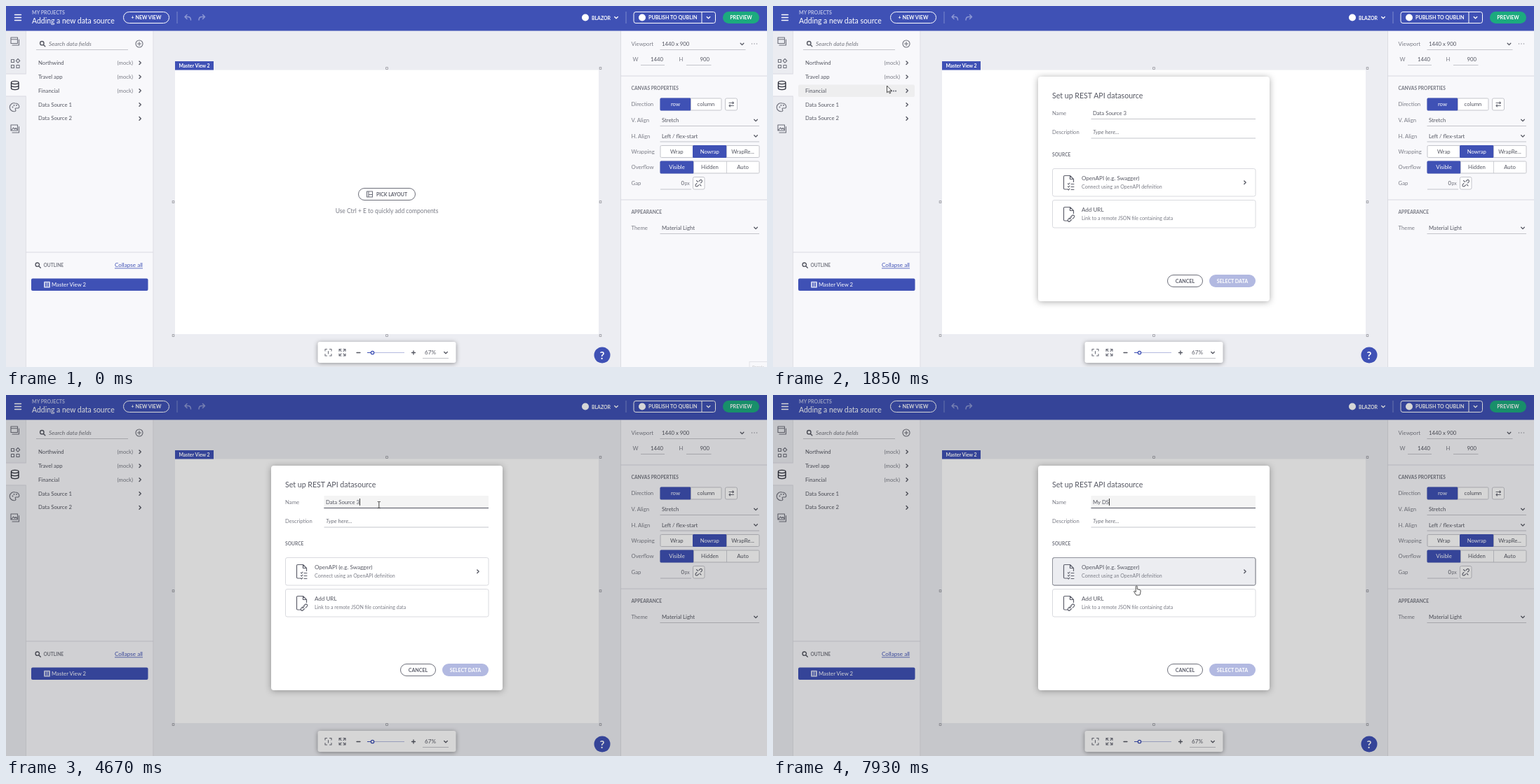
An HTML page for the animation above (7990 ms loop, 1085x516 px).

```html
<!DOCTYPE html>
<html lang="en">
<head>
<meta charset="utf-8">
<title>Adding a new data source</title>
<style>
html, body { margin: 0; width: 100%; height: 100%; overflow: hidden; background: #ecedf2; }
svg { display: block; width: 1085px; height: 516px; }
text { font: 7.75px Lato, "Open Sans", sans-serif; fill: #555762; dominant-baseline: central; white-space: pre; }
.label { fill: #7b7d87; }
.white { fill: #fff; }
.caps { font-size: 7.1px; font-weight: 700; fill: #5f616d; }
.head { font-size: 6.65px; font-weight: 700; fill: #777983; }
.caps.white { fill: #fff; }
.hint { font-style: italic; font-size: 8.1px; fill: #73757e; }
.off { fill: #c1c2c7; }
.mid { text-anchor: middle; }
.end { text-anchor: end; }
.icon { fill: none; stroke: #6d6f7a; stroke-width: 1.1; stroke-linecap: round; stroke-linejoin: round; }
.shadow { filter: drop-shadow(0 1px 3px #0006); }
</style>
</head>
<body>
<svg id="stage" viewBox="0 0 1085 516"></svg>
<script>
const BLUE = '#3f51b5', LINE = '#c4c5cb', INK = '#555762';

const text = (x, y, s, cls = '', size) =>
  `<text x="${x}" y="${y}" class="${cls}"${size ? ` style="font-size:${size}px"` : ''}>${s}</text>`;
const box = (x, y, w, h, fill, extra = '') =>
  `<rect x="${x}" y="${y}" width="${w}" height="${h}" fill="${fill}" ${extra}/>`;
const stroked = (x, y, w, h, color, r = 2, fill = 'none') =>
  box(x, y, w, h, fill, `stroke="${color}" rx="${r}"`);
const path = (d, stroke = '#6d6f7a', extra = '') =>
  `<path d="${d}" class="icon" style="stroke:${stroke};${extra}"/>`;
const dot = (x, y, r, fill) => `<circle cx="${x}" cy="${y}" r="${r}" fill="${fill}"/>`;
const hline = (x1, x2, y, color = LINE) => box(x1, y - .5, x2 - x1, 1, color);
const down = (x, y, c = INK) => path(`M${x - 2.3} ${y - 1}l2.3 2.3 2.3-2.3`, c, 'stroke-width:1.3');
const right = (x, y, c = INK) => path(`M${x - 1} ${y - 2.3}l2.3 2.3-2.3 2.3`, c, 'stroke-width:1.4');
const lens = (x, y) => path(`M${x + 1.2} ${y + 1.2}l2.6 2.6M${x + 2} ${y - .8}a2.7 2.7 0 1 1-5.4 0a2.7 2.7 0 1 1 5.4 0`, INK, 'stroke-width:1.4');
const layer = (id, content) => `<g id="${id}">${content}</g>`;

function header() {
  return box(0, 0, 1085, 35.5, BLUE) +
    path('M12.5 12.5h9M12.5 16.5h9M12.5 20.5h9', '#fff', 'stroke-width:1.4') +
    text(37, 9.3, 'MY PROJECTS', 'caps', 7).replace('<text', '<text style="fill:#b9c0e6"').replace(' style="font-size:7px"', '') +
    text(37, 20.8, 'Adding a new data source', 'white', 10.45) +
    stroked(167.5, 8.5, 65, 16, '#fff', 8) + text(200, 16.5, '+ NEW VIEW', 'caps white mid') +
    box(243.5, 8, 1, 17, '#7d89cd') +
    path('M258 12.5l-3 3 3 3M255.300 15.500h4.500q3.500 0 3.700 4.500', '#8c97d3', 'stroke-width:1.5') +
    path('M280.500 12.500l3 3-3 3M283.200 15.500h-4.500q-3.500 0-3.700 4.500', '#8c97d3', 'stroke-width:1.5') +
    dot(826, 16.500, 5, '#fff') + text(835, 16.5, 'BLAZOR', 'caps white', 6.9) + down(870, 16.5, '#fff') +
    box(883.5, 8, 1, 17, '#7d89cd') +
    stroked(895, 8.5, 116.5, 16, '#fff', 3) + box(991.5, 8.5, 1, 16, '#fff') +
    dot(907, 16.5, 5, '#fff') + text(916, 16.5, 'PUBLISH TO QUBLIN', 'caps white') + down(1001.5, 16.5, '#fff') +
    box(1022, 8, 52, 17, '#1caa7e', 'rx="8.5"') + text(1048, 16.5, 'PREVIEW', 'caps white mid');
}

function rail() {
  return box(0, 35.5, 28, 481, '#ebecf1') + box(0, 97, 28, 32, '#f8f8fb') +
    hline(0, 28, 97, '#d9dae1') + hline(0, 28, 129, '#d9dae1') +
    path('M7 45h9.500v8.500h-9.500zM7 47.700h9.500M9 56h9.500v-8') +
    path('M7.500 76.500h4v4h-4zM7.500 84.500h4v4h-4zM15 84.500h4v4h-4zM17 75.500l2.800 2.800-2.800 2.800-2.800-2.800z') +
    path('M7.500 109.500a5 2 0 0 1 10.500 0v8a5 2 0 0 1-10.500 0zM7.500 109.500a5 2 0 0 0 10.500 0M7.500 113.500a5 2 0 0 0 10.500 0', '#32343f', 'stroke-width:1.4') +
    path('M13 139a6 6 0 1 0 0 11.500q1.500-.500.500-2.500t1-2h3q1.500-.500 1.300-2.500q-1-4.500-5.800-4.500z') +
    [[9.5, 144.5], [11.5, 142], [15, 142]].map(p => dot(...p, .9, '#6d6f7a')).join('') +
    path('M7 170h9.500v8h-9.500zM8 177l2.500-3 2 2 1.500-1.500 2 2M9 181h9.500v-8.500');
}

function leftPanel() {
  const rows = ['Northwind', 'Travel app', 'Financial', 'Data Source 1', 'Data Source 2'];
  return box(28, 35.5, 182, 481, '#f8f8fb') + box(28, 35.5, .8, 481, '#d9dae1') + box(209.5, 35.5, .8, 481, '#d9dae1') +
    box(28, 97.5, 1, 31, '#f8f8fb') + layer('rowHover', box(36, 112.5, 166, 17.5, '#eeeeef', 'rx="2"')) +
    lens(52, 54) + text(61, 53.7, 'Search data fields', 'hint', 8.3) + hline(43, 174, 62.5) +
    layer('plusHover', dot(190, 54, 8.5, '#e6e7ec')) +
    path('M195 54a5 5 0 1 1-10 0a5 5 0 1 1 10 0M187.500 54h5M190 51.500v5') +
    rows.map((s, i) => text(46, 80.8 + i * 19.9, s) + right(191, 81.3 + i * 19.9)).join('') +
    text(181, 80.8, '(mock)', 'label end') + text(181, 100.7, '(mock)', 'label end') +
    layer('mock', text(181, 120.6, '(mock)', 'label end')) +
    layer('dots', [169, 172, 175].map(x => dot(x, 121.5, .9, INK)).join('')) +
    hline(28, 210, 352, '#d9dae1') + lens(45.5, 370.5) + text(53.5, 369.8, 'OUTLINE', 'head') +
    text(195, 369.5, 'Collapse all', 'end', 8.1).replace('<text', `<text fill="${BLUE}" text-decoration="underline"`).replace('style="', `style="fill:${BLUE};`) +
    box(36, 389.5, 166.5, 17.5, BLUE, 'rx="2"') + box(54, 393.8, 9, 9, '#c9cfec', 'rx="1"') +
    path('M57 396v4.500M60 396v4.500', BLUE, 'stroke-width:1.5') + text(65, 398, 'Master View 2', 'white');
}

function canvasArea() {
  const handles = [[543, 89], [847.5, 89], [238.5, 280], [847.5, 280], [238.5, 471], [543, 471], [847.5, 471]];
  return box(241, 91.5, 604, 377.5, '#fff') + box(241, 79, 55, 12.5, BLUE) +
    text(268.5, 85, 'Master View 2', 'caps white mid', 6.9) +
    handles.map(([x, y]) => box(x - 1.3, y - 1.3, 2.6, 2.6, '#fff', 'stroke="#8a8c95" stroke-width=".8"')).join('') +
    stroked(502.5, 260.5, 81, 17, '#6d6f7a', 8.5) +
    path('M514.500 265h8v8h-8zM517 265v8M517 269.500h5.500') + text(528, 269, 'PICK LAYOUT', 'caps', 6.9) +
    text(543, 293.3, 'Use Ctrl + E to quickly add components', 'label mid', 8.5) +
    box(444.5, 480, 197, 30, '#fff', 'rx="3" class="shadow"') +
    path('M455 493v-2.500h2.500M461.500 490.500h2.500v2.500M464 497.500v2.500h-2.500M457.500 500h-2.500v-2.500M459.500 493.500v3.500') +
    path('M475 493.500v-3h3M481 490.500h3v3M484 497v3h-3M478 500h-3v-3M475 490.500l3 3M484 490.500l-3 3M484 500l-3-3M475 500l3-3') +
    path('M500 495.500h5M578.500 495.500h5M581 493v5', INK, 'stroke-width:1.3') +
    hline(515, 568, 495.500, '#b5bbdf') + hline(515, 522, 495.5, BLUE) +
    `<circle cx="522.5" cy="495.5" r="2.2" fill="#fff" stroke="${BLUE}" stroke-width="1.3"/>` +
    text(597, 495, '67%', '', 8.1) + down(627, 495.5) + hline(594, 631, 503.5) +
    dot(850, 499, 11.5, BLUE) + text(850, 499, '?', 'caps white mid', 15);
}

function segments(y, labels, edges, active) {
  const x0 = edges[0], last = edges[edges.length - 1];
  return stroked(x0, y, last - x0, 17, LINE, 1.5, '#fff') + labels.map((s, i) => {
    const x = edges[i], w = edges[i + 1] - x, on = i === active;
    return (on ? box(x - .5, y - .5, w + 1, 18, BLUE, 'rx="1.5"') : i ? box(x, y, .8, 17, LINE) : '') +
      text(x + w / 2, y + 8.2, s, on ? 'white mid' : 'mid');
  }).join('');
}

function rightPanel() {
  const labels = [['Viewport', 54], ['Direction', 140], ['V. Align', 163], ['H. Align', 185.5],
    ['Wrapping', 208], ['Overflow', 230], ['Gap', 252.8], ['Theme', 317]];
  const select = (y, s, end = 1074) => text(935, y, s) + hline(932.5, end, y + 8.5) + down(end - 5, y + .3);
  return box(876, 35.5, 209, 481, '#f8f8fb') + box(876, 35.5, .8, 481, '#d5d6dd') +
    labels.map(([s, y]) => text(891.5, y, s, 'label')).join('') +
    select(54, '1440 x 900', 1054.5) + [1063.5, 1067, 1070.5].map(x => dot(x, 54, .7, '#8a8c95')).join('') +
    text(893.5, 76.3, 'W', 'label') + text(937, 76.3, '1440', 'end') + hline(905, 939, 84.5) +
    text(959.5, 76.3, 'H', 'label') + text(1003, 76.3, '900', 'end') + hline(970, 1005.5, 84.5) +
    hline(876, 1085, 100, '#d9dae1') + text(891.5, 117, 'CANVAS PROPERTIES', 'head') +
    segments(132, ['row', 'column'], [933, 976, 1020], 0) +
    stroked(1025.5, 132, 17, 17, LINE, 2, '#fff') +
    path('M1031 138.500h6.500M1036 137l1.500 1.500-1.500 1.500M1037.500 142.500h-6.500M1032.500 141l-1.500 1.500 1.500 1.500') +
    select(163, 'Stretch') + select(185.5, 'Left / flex-start') +
    segments(199.5, ['Wrap', 'Nowrap', 'WrapRe...'], [933, 979.5, 1027, 1074], 1) +
    segments(222, ['Visible', 'Hidden', 'Auto'], [933, 980, 1027, 1074], 0) +
    text(967, 252.8, '0', 'end') + text(967.5, 253, 'px', 'label', 7) + hline(933, 977, 262) +
    stroked(979.5, 244.5, 16.5, 17.5, LINE, 2, '#fff') +
    path('M986.500 251.500l-2-2M989 255l2 2M988 250.500l1.500-1.500a1.700 1.700 0 0 1 2.500 2.500l-1.500 1.500M987.500 256l-1.500 1.500a1.700 1.700 0 0 1-2.500-2.500l1.500-1.500') +
    hline(876, 1085, 277, '#d9dae1') + text(891.5, 293.8, 'APPEARANCE', 'head') + select(317, 'Material Light') +
    layer('corner', stroked(1060, 508.5, 30, 12, '#e1e2e7', 0) + text(1064, 515.8, 'Panels', 'off', 6));
}

function popup() {
  const item = (y, tag, name, on) => {
    const c = on ? '#5f616d' : '#c1c2c7';
    return path(`M81 ${y - 4}v-7h10l5 5v17h-15v-3M91 ${y - 11}v5h5`, c) +
      box(76.5, y - 2, 14.5, 7.5, c) + text(83.8, y + 1.8, tag, 'caps white mid', 4.9) +
      text(106.5, y, name, on ? '' : 'off') +
      (on ? '' : path(`M172.500 ${y - 1}h7v4.500h-7zM174 ${y - 1}v-1.500a2 2 0 0 1 4 0v1.500`, c));
  };
  return box(65, 62.500, 130, 152, '#fff', 'rx="2" class="shadow"') +
    layer('restHover', box(65, 91, 130, 39, '#efeff1')) +
    text(74, 76, 'PICK DATA SOURCE', 'head') +
    item(110.3, 'REST', 'REST API', true) + item(151.5, 'CSV', 'CSV File') + item(192.8, 'XLS', 'Quilo Workbook');
}

function dialog() {
  const file = y => path(`M420 ${y + 20}h-4q-1.500 0-1.500-1.500v-16.500q0-1.500 1.500-1.500h7.500l5 5v4M423.500 ${y + .5}v5h5`, '#5f616d', 'stroke-width:1.2');
  const card = (y, title, note) => stroked(398.5, y, 289.5, 39.5, '#d9dadf', 2.5) + file(y + 9.5) +
    text(440, y + 13, title, '', 8.05) + text(440, y + 25.8, note, 'label', 7.06);
  return box(378, 101, 330, 321, '#fff', 'rx="4" style="filter:drop-shadow(0 1px 5px #0005)"') +
    text(398, 127.8, 'Set up REST API datasource', '', 10.6) +
    text(398, 152.5, 'Name', 'label') + text(398, 180.3, 'Description', 'label', 7.6) +
    layer('nameHover', box(453.5, 144, 234.5, 17.5, '#f4f4f4')) +
    layer('descHover', box(453.5, 172, 234.5, 17, '#f4f4f4')) +
    hline(453.5, 688, 161.5) + layer('nameLine', hline(453.5, 688, 161.5, '#84868e')) +
    layer('focusLine', box(453.5, 160.9, 234.5, 1.3, '#6d6f7a')) + hline(453.5, 688, 189) +
    layer('selection', box(456, 148, 48, 10, '#0078d7')) +
    '<text id="field" x="456" y="152.5"></text>' + box(0, 148, .9, 10, '#222', 'id="caret"') +
    text(456, 180.3, 'Type here...', 'hint', 8) + text(398, 212.3, 'SOURCE', 'head') +
    layer('cardHover', stroked(398.5, 232.5, 289.5, 39.5, '#90929b', 2.5, '#ecedf1')) +
    card(232.5, 'OpenAPI (e.g. Swagger)', 'Connect using an OpenAPI definition') +
    path('M420.500 254l1 1 1.500-2M420.500 258l1 1 1.500-2M420.500 262l1 1 1.500-2M425 254.500h4M425 258.500h4M425 262.500h4', '#5f616d') +
    right(672.8, 252.3) + layer('cardEdge', stroked(398.5, 232.5, 289.5, 39.5, '#90929b', 2.5)) +
    card(277.5, 'Add URL', 'Link to a remote JSON file containing data') +
    path('M424.500 301.500l2-2a1.900 1.900 0 0 1 2.700 2.700l-2 2M425 302.500l-2 2M425.500 305.500l-2 2a1.900 1.900 0 0 1-2.700-2.700l2-2', '#5f616d') +
    stroked(562.5, 384.5, 50, 17, '#6d6f7a', 8.5) + text(587.5, 393, 'CANCEL', 'caps mid') +
    box(622, 384, 66, 18, '#b2b9e1', 'rx="9"') + text(655, 393, 'SELECT DATA', 'caps white mid');
}

const cursors =
  '<path id="arrow" d="M.500.500v9.800l2.300-2 1.500 3.200 1.500-.700-1.500-3.100h3z" fill="#fff" stroke="#222" stroke-width=".8"/>' +
  '<path id="hand" d="M-1 6V1q1-1.300 2 0v4l4 1q1 .400.900 1.500l-.600 4-.800 2H-.5L-3.500 9q-.500-1.500.700-1.300L-1 9z" fill="#fff" stroke="#222" stroke-width=".8"/>' +
  '<path id="beam" d="M-2-4.500h1.500l.500.500.500-.500H2M0-4v8M-2 4.500h1.500l.500-.500.500.500H2" fill="none" stroke="#333" stroke-width=".9"/>';

document.getElementById('stage').innerHTML =
  box(0, 0, 1085, 516, '#ecedf2') + canvasArea() + rail() + leftPanel() + rightPanel() + header() +
  layer('popup', popup()) + box(0, 0, 1085, 516, '#000', 'id="dim" opacity=".16"') +
  layer('dialog', dialog()) + layer('cursor', cursors);

const $ = id => document.getElementById(id);
const show = (id, on) => { $(id).style.display = on ? '' : 'none'; };

// start, end, from, control point, to
const moves = [
  [40, 830, [1070, 506], [220, -45], [188, 50]],
  [970, 1410, [188, 50], [187, 64], [180.5, 77.5]],
  [1410, 1720, [180.5, 77.5], [172, 97], [162, 113.5]],
  [2090, 2800, [162, 113.5], [430, 325], [531.8, 157]],
  [7350, 7930, [531.8, 157], [522, 206], [518.3, 272.5]]
];
const typed = [[0, 'Data Source 3'], [5920, 'M'], [6150, 'My'], [6260, 'My '], [6610, 'My D'], [6810, 'My DS']];

function pointer(t) {
  const [start, end, a, c, b] = moves.filter(m => t >= m[0]).pop() || moves[0];
  const u = Math.min(1, Math.max(0, (t - start) / (end - start))), s = u * u * (3 - 2 * u);
  return [0, 1].map(i => (1 - s) ** 2 * a[i] + 2 * s * (1 - s) * c[i] + s * s * b[i]);
}

function render(t) {
  const [x, y] = pointer(t);
  const menu = t >= 970 && t < 1800, open = t >= 1850, focus = t >= 4670;
  const inField = open && x > 453 && y > 144 && y < 162;
  const inDesc = open && x > 453 && y > 172 && y < 189;
  const onCard = t > 7350 && y > 232;
  const onPlus = t < 1400 && x < 199 && y > 45 && y < 63;
  const onRest = menu && y > 91;
  const onRow = t >= 1800 && t < 2090;
  const selected = t >= 4750 && t < 5920;

  show('corner', t < 40);
  show('popup', menu);
  show('restHover', onRest);
  show('plusHover', onPlus);
  show('rowHover', onRow);
  show('dots', onRow);
  show('mock', !onRow);
  show('dim', t >= 1880);
  show('dialog', open);
  show('nameHover', inField || focus);
  show('nameLine', inField);
  show('focusLine', focus);
  show('descHover', inDesc);
  show('cardHover', onCard);
  show('cardEdge', onCard);
  show('selection', selected);

  const field = $('field');
  field.textContent = typed.filter(k => t >= k[0]).pop()[1];
  field.style.fill = selected ? '#fff' : '';
  show('caret', focus && !selected && !(t >= 7350 && t < 7850));
  if (focus) $('caret').setAttribute('x', 456 + field.getComputedTextLength());

  const hand = onPlus || onRest || onCard, beam = inField || inDesc;
  show('hand', hand);
  show('beam', beam);
  show('arrow', !hand && !beam);
  show('cursor', t >= 40);
  $('cursor').setAttribute('transform', `translate(${x} ${y})`);
}

function frame() {
  render(performance.now() % 7990);
  requestAnimationFrame(frame);
}
frame();
</script>
</body>
</html>
```
